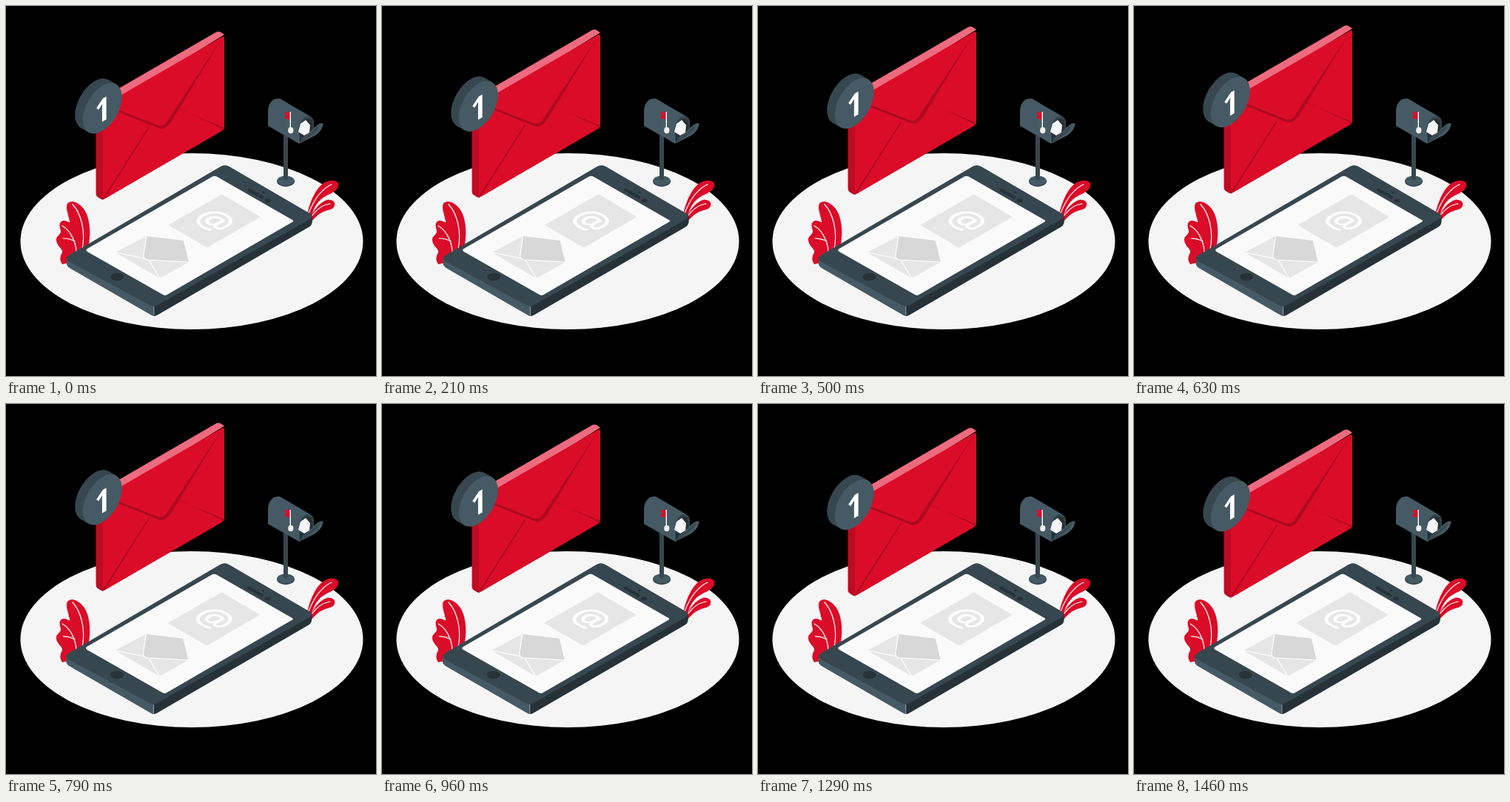
An HTML page for the animation above (1500 ms loop, 500 by 500 pixels).

```html
<!DOCTYPE html>
<html lang="en">
<head>
<meta charset="utf-8">
<title>New mail</title>
<style>
  html, body { margin: 0; height: 100%; background: #000; overflow: hidden; }
  svg { display: block; width: 100%; height: 100%; }
  text { font-family: "Open Sans", "Noto Sans", sans-serif; font-weight: 700; }
  .red { fill: #db0c28; }
  .maroon { fill: #ad0a20; }
  .slate { fill: #455a64; }
  .dark { fill: #37474f; }
  .ink { fill: #263238; }
  .vein { fill: none; stroke: #fff; stroke-width: 1.2; stroke-linecap: round; }
</style>
</head>
<body>
<svg viewBox="0 0 500 500">
  <ellipse cx="251" cy="318" rx="231.5" ry="119" fill="#f5f5f5"/>

  <g id="leftPlant">
    <path class="red" d="M99 332L112 322C115 304 113 285 105 274C98 265 88 261 83 267C80 272 84 281 86 291L92 318Z"/>
    <path class="red" d="M76 349C72 343 73 338 76 333C77 328 69 325 68 317C67 311 73 310 74 305C74 300 70 295 75 291C80 288 84 293 89 293C95 293 98 297 98 303C99 309 105 311 105 318L106 330L90 346Z"/>
    <path class="vein" d="M90 268C101 280 108 304 103 328M76 297C88 304 95 320 95 334M77 314Q86 314 93 318"/>
  </g>

  <g id="rightPlant">
    <path class="red" d="M407 282C411 262 421 241 434 237C443 234 451 237 449 244C446 253 431 255 424 263C418 269 415 276 413 284Z"/>
    <path class="red" d="M411 287C417 273 425 265 434 262C441 261 446 265 444 270C442 276 434 275 427 279C421 282 417 287 412 292Z"/>
    <path class="vein" d="M409 280C416 262 427 247 440 241M414 283C420 274 428 269 438 267"/>
  </g>

  <g id="mailbox">
    <ellipse class="dark" cx="378" cy="237" rx="12" ry="7.2"/>
    <ellipse class="slate" cx="378" cy="235.8" rx="11.5" ry="6.4"/>
    <path class="dark" d="M375 172H381V234Q378 237 375 234Z"/>
    <path class="slate" d="M354 162V142C354 132 360 124 370 125L411 149L396 186Z"/>
    <path class="ink" d="M396 186V168C396 157 402 148 410 149C415 150 416 155 416 161V173Z"/>
    <path class="dark" d="M396 168C396 157 402 148 410 149C415 150 416 155 416 161V169L414.500 170V161C414 154 411 151 407 152C401 153 397 160 397 168V185L396 186Z"/>
    <path d="M398 159L405 154L411 161L410 171L403 175L395 170Z" fill="#f5f5f5"/>
    <path class="slate" d="M396 186L401 178C410 174 415 164 422 160Q427 157 428.500 159C428 166 423 172 416 176Z"/>
    <path class="dark" d="M396 186L401 179C411 175 417 164 424 161C422 167 414 175 396 186Z"/>
    <path class="red" d="M376 142L380 144L384 142V154L380 152L376 152L378 147Z"/>
    <path d="M383.500 143H385V165H383.500Z" fill="#f5f5f5"/>
    <ellipse cx="384.800" cy="168" rx="3.600" ry="4.200" fill="#f0f0f0"/>
  </g>

  <g id="phone">
    <path class="slate" d="M82 342V348Q82 351 86 354L196 417.500Q200 419.500 200 419L202 400L95 335Z"/>
    <path class="ink" d="M200 404V419Q202 419 205 417.500L409 299Q414 296 414 291V284Z"/>
    <path class="dark" d="M85 345Q79 341 85 337L290 217Q296 213.500 302 217L411 280.500Q417 284 411 288L206 403.500Q200 407 194 404Z"/>
    <path d="M200 406V418" stroke="#a9b3b8" stroke-width=".8"/>
    <path d="M110 332Q107 330 110 328L279 230.500Q282 229 285 230.500L387 289Q390 290.500 387 292L218 390Q215 392 212 390Z" fill="#fafafa"/>
    <ellipse class="ink" cx="150.500" cy="366" rx="9" ry="5.200"/>
    <path d="M328.500 248.500L346.500 258.500" stroke="#263238" stroke-width="4" stroke-linecap="round"/>
    <ellipse class="ink" cx="348" cy="252" rx="1.800" ry="1.200"/>
    <ellipse class="ink" cx="354" cy="263" rx="4" ry="2.500"/>

    <path d="M221 297Q219 296 221 295L290 255.500Q292 254.500 294 255.500L342 284Q344 285 342 286L274 325.500Q272 327 270 325.500Z" fill="#e6e6e6"/>
    <text transform="matrix(.866 .5 -.866 .5 281 291)" y="14" font-size="47" text-anchor="middle" fill="#fff" style="font-weight:600">@</text>

    <path d="M148 333L190 311L247 346L208 368Z" fill="#e6e6e6"/>
    <path d="M190 311L240 317L247 346L191 343Q186 342 186 338Z" fill="#d8d8d8"/>
    <path d="M148 333L187 341M190 311L186 337Q186 342 191 343L247 346M193 343L208 368" fill="none" stroke="#fff" stroke-width="1.200"/>
  </g>

  <g id="envelope">
    <path d="M121.500 135Q121.500 130 126 127L284 35.500Q287 34 290 35.500L295 39L131 140Z" fill="#ed6b7f"/>
    <path d="M121.500 132L132 138V262Q130 262 128 261L124 258.500Q121.500 257 121.500 253Z" fill="#bd0b24"/>
    <path class="red" d="M131 140Q131 136 134 133L291 42.500Q295 40 295 44V162Q295 167 291 169.500L135 260Q131 262.500 131 258Z"/>
    <path class="maroon" d="M131 260L192.500 163.500L194 164L133 261ZM295 165L233 139L236 139.500L295 167.500Z"/>
    <path class="maroon" d="M133 133L204 161Q212 164 217 157L293 42L223 157Q214 169 205 165L133 136Z"/>

    <path class="dark" d="M138.400 100L149 106L111.600 171L101 165Z"/>
    <circle class="dark" r="30.600" transform="matrix(.866 -.5 0 1 119.700 132.500)"/>
    <circle class="slate" r="30.600" transform="matrix(.866 -.5 0 1 130.300 138.500)"/>
    <text transform="matrix(.866 -.5 0 1 120 162.500)" font-size="43.500" fill="#fff">1</text>
  </g>
</svg>
<script>
const LOOP = 1500, STEPS = 36;
const SHAKE = [0, -1, 2, -4, 4, -4, 4, -4, 2, -1, 0];
const phone = document.getElementById("phone");
const envelope = document.getElementById("envelope");

// Linear interpolation through evenly spaced keyframes
function track(keys, p) {
  const x = p * (keys.length - 1), i = Math.floor(x);
  return keys[i] + (keys[i + 1] - keys[i]) * (x - i);
}

function draw(now) {
  // 24 steps per second, each posed at its midpoint
  const step = Math.floor((now % LOOP) / LOOP * STEPS + .15) % STEPS;
  const p = (step + .5) / STEPS;
  phone.setAttribute("transform", `translate(${track(SHAKE, p)} 0)`);
  envelope.setAttribute("transform", `translate(0 ${track([0, -10, 0], p)})`);
}

const start = performance.now();
function tick() {
  draw(performance.now() - start);
  requestAnimationFrame(tick);
}
tick();
</script>
</body>
</html>
```
